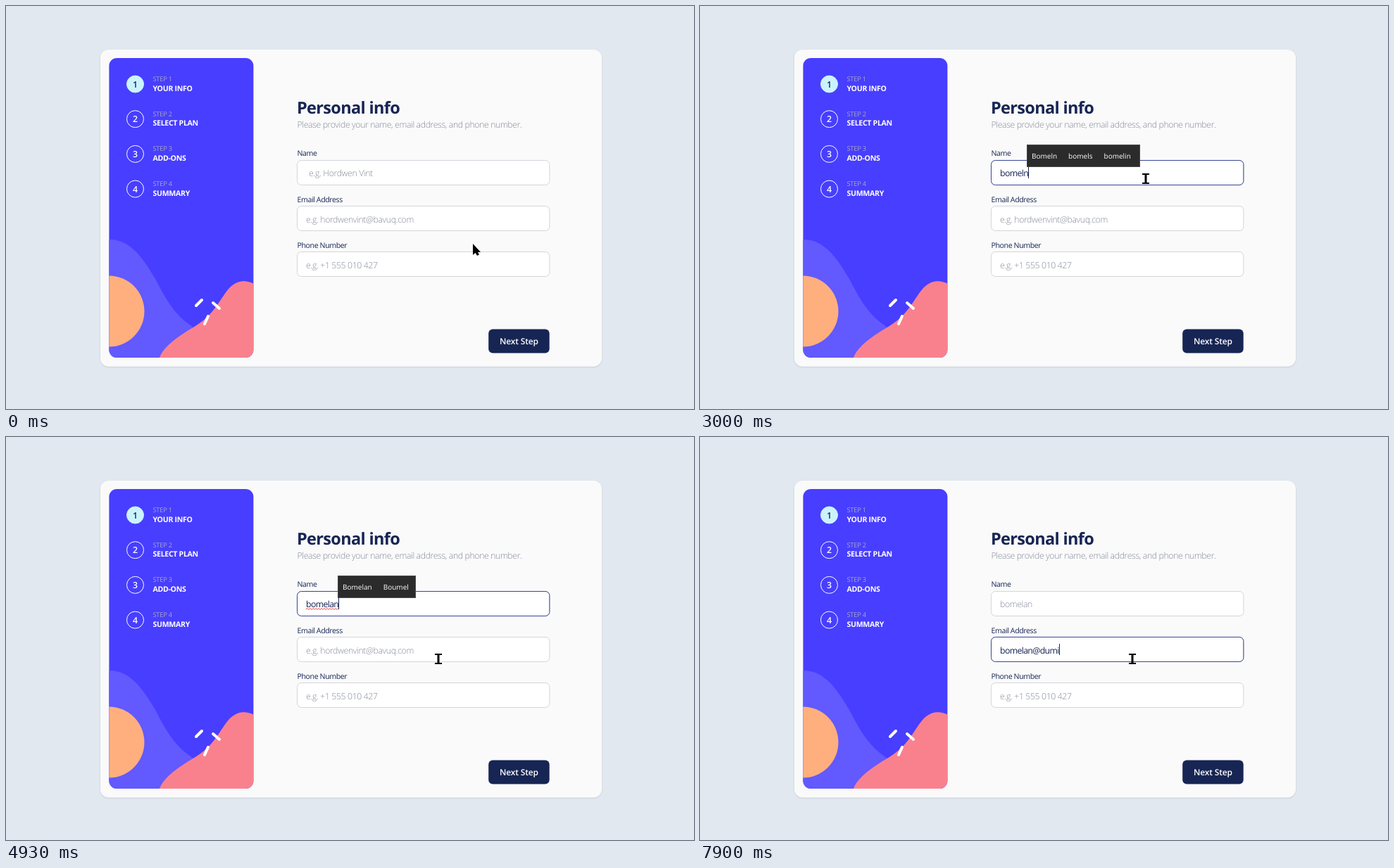
Write an HTML page that moves like this. It is 977x573 px and loops after 8 s.

```html
<!DOCTYPE html>
<html lang="en">
<head>
<meta charset="utf-8">
<title>Personal info form</title>
<style>
  html, body { margin: 0; width: 100%; height: 100%; overflow: hidden; background: #e2e8f0; }
  svg { display: block; width: 977px; height: 573px; }
  text { font-family: "Open Sans", "Noto Sans", sans-serif; text-rendering: geometricPrecision; fill: #172554; }
  .title { font-size: 23.5px; font-weight: 700; letter-spacing: -.67px; }
  .body { font-size: 12.3px; font-weight: 300; letter-spacing: -.39px; }
  .grey { fill: #838997; }
  .typed { font-size: 12.3px; letter-spacing: -.65px; }
  .label { font-size: 10.6px; letter-spacing: -.4px; }
  .step { font-size: 9.3px; letter-spacing: -.25px; fill: #a5a6c4; }
  .name { font-size: 10.6px; font-weight: 700; letter-spacing: -.32px; fill: #fff; }
  .num { font-size: 12.4px; font-weight: 600; text-anchor: middle; fill: #fff; }
  .button { font-size: 12px; font-weight: 600; letter-spacing: -.15px; text-anchor: middle; fill: #fff; }
  .word { font-size: 10px; font-weight: 500; fill: #fff; }
</style>
</head>
<body>
<svg id="stage" viewBox="0 0 977 573">
  <defs>
    <clipPath id="panel"><rect x="146.4" y="74" width="205" height="426" rx="11"/></clipPath>
    <filter id="soft" x="-5%" y="-5%" width="110%" height="110%">
      <feDropShadow dx="0" dy="1" stdDeviation="1" flood-color="#000" flood-opacity=".13"/>
    </filter>
  </defs>
  <rect x="134" y="62" width="712" height="450.5" rx="12" fill="#fafafa" filter="url(#soft)"/>
  <g clip-path="url(#panel)">
    <rect x="146" y="74" width="206" height="426" fill="#483eff"/>
    <path fill="#6259ff" d="M146 332C175 331 194 357 212 388C228 419 240 440 266 457L230 500H146Z"/>
    <path fill="#f9818e" d="M218 500C222 487 240 472 265 457.5C292 442 300 424 313 406C323 392.5 336 387 352 395V500Z"/>
    <circle cx="146" cy="434" r="50.5" fill="#ffaf7e"/>
    <path stroke="#fff" stroke-width="4" stroke-linecap="round" d="M270 426L278 418M294 422L303 430M282 452L287 441"/>
  </g>
  <g id="steps"></g>
  <text class="title" x="413" y="152.5">Personal info</text>
  <text class="body grey" x="413.5" y="172.5">Please provide your name, email address, and phone number.</text>
  <g id="fields"></g>
  <rect x="685.2" y="459.5" width="86.5" height="34" rx="6" fill="#172554"/>
  <text class="button" x="728.5" y="481.3">Next Step</text>
  <path id="squiggle" fill="none" stroke="#e5383b"/>
  <rect id="caret" width="1" height="16" fill="#172554"/>
  <g id="popup">
    <rect x=".5" y=".5" height="31" fill="#2b2b2b" stroke="#484848"/>
    <text class="word" x="7" y="20.3"></text>
  </g>
  <path id="arrow" d="M0 0V16L3.6 13L6 17L9 15.5L7 12H11Z"/>
  <path id="beam" d="M-5 -7H5V-5H1.5V6H5V8H-5V6H-1.5V-5H-5Z"/>
</svg>
<script>
const LOOP = 8000, TEXT_X = 426;
const $ = id => document.getElementById(id);

function add(parent, tag, attrs, text = "") {
  const el = document.createElementNS("http://www.w3.org/2000/svg", tag);
  for (const key in attrs) el.setAttribute(key, attrs[key]);
  el.textContent = text;
  return parent.appendChild(el);
}

["YOUR INFO", "SELECT PLAN", "ADD-ONS", "SUMMARY"].forEach((name, i) => {
  const y = 111 + i * 49.7, active = i === 0, g = $("steps");
  add(g, "circle", { cx: 183.5, cy: y, r: 12, fill: active ? "#cbf3fe" : "none", stroke: active ? "#cbf3fe" : "#fff" });
  add(g, "text", { class: "num", x: 183.5, y: y + 4.6, style: active ? "fill:#172554" : "" }, i + 1);
  add(g, "text", { class: "step", x: 208.5, y: y - 4 }, "STEP " + (i + 1));
  add(g, "text", { class: "name", x: 208.5, y: y + 9.6 }, name);
});

const fields = [
  ["Name", "e.g. Hordwen Vint", 430],
  ["Email Address", "e.g. hordwenvint@bavuq.com", TEXT_X],
  ["Phone Number", "e.g. +1 555 010 427", TEXT_X]
].map(([label, hint, hintX], i) => {
  const top = 219.5 + i * 65.4, g = $("fields");
  const box = { x: 413.5, y: Math.round(top) - .5, width: 358.4, height: 35, rx: 6 };
  add(g, "text", { class: "label", x: 413.5, y: top - 6.3 }, label);
  add(g, "rect", { ...box, fill: "#fff", stroke: "#d3d5dc" });
  const ring = add(g, "rect", { ...box, fill: "none", stroke: "#3a4695" });
  return { top, hint, hintX, ring, text: add(g, "text", { y: top + 22.8 }) };
});

// time, field, text typed so far
const keys = [
  [1560, 0, "b"], [1610, 0, "bo"], [1840, 0, "bom"], [1950, 0, "bomel"], [2060, 0, "bomela"],
  [2580, 0, "bomel"], [2720, 0, "bomeln"], [3220, 0, "bomel"], [3480, 0, "bomela"], [3550, 0, "bomelan"],
  [5720, 1, "b"], [5790, 1, "bo"], [6000, 1, "bom"], [6100, 1, "bome"], [6200, 1, "bomel"],
  [6300, 1, "bomela"], [6400, 1, "bomelan"], [7000, 1, "bomelan@"],
  [7470, 1, "bomelan@d"], [7610, 1, "bomelan@du"], [7760, 1, "bomelan@dum"], [7900, 1, "bomelan@dumi"]
];

// field, focus start, focus end, caret blink origin
const focuses = [[0, 610, 4950, 110], [1, 4950, LOOP, 5070]];

// from, to, left, top, width, suggestions
const popups = [
  [2340, 2580, 466, 197, 142, ["Bomelan", "bene", "benei"]],
  [3000, 3220, 464, 197, 161, ["Bomeln", "bomels", "bomelin"]],
  [3980, 4950, 471, 197, 111, ["Bomelan", "Boumel"]],
  [6650, 6930, 471, 263, 111, ["Bomelan", "Boumel"]]
];

// from, to, start point, end point
const moves = [[0, 640, 663, 338, 633, 245], [4400, 4900, 633, 245, 614, 315]];

let wave = "M426 245";
for (let x = 428, up = true; x <= 472; x += 2, up = !up) wave += `L${x} ${up ? 243.5 : 245.5}`;
$("squiggle").setAttribute("d", wave);

const clamp = v => Math.max(0, Math.min(1, v));
const ease = p => p * p * (3 - 2 * p);
const show = (el, on) => el.setAttribute("visibility", on ? "visible" : "hidden");
const place = (el, x, y) => el.setAttribute("transform", `translate(${x} ${y})`);

function drawFields(t) {
  const focus = focuses.find(f => t >= f[1] && t < f[2]);
  fields.forEach((field, i) => {
    const last = keys.filter(k => k[1] === i && k[0] <= t).pop();
    const focused = !!focus && focus[0] === i;
    const { text, top } = field;
    text.textContent = last ? last[2] : field.hint;
    text.setAttribute("x", last ? TEXT_X : field.hintX);
    text.setAttribute("class", last && focused ? "typed" : "body grey");
    field.ring.setAttribute("opacity", focused ? clamp((t - focus[1]) / 120) : 0);
    if (!focused) return;
    const origin = last ? last[0] : focus[3];
    const x = TEXT_X + (last ? text.getComputedTextLength() : 0);
    $("caret").setAttribute("x", Math.round(x));
    $("caret").setAttribute("y", Math.round(top + 9));
    show($("caret"), (t - origin) % 1000 < 500);
  });
  if (!focus) show($("caret"), false);
  show($("squiggle"), t >= 4440 && t < 4950);
}

function drawPopup(t) {
  const item = popups.find(p => t >= p[0] && t < p[1]);
  show($("popup"), item);
  if (!item) return;
  const [, , left, top, width, words] = item;
  const [box, line] = $("popup").children;
  place($("popup"), left, top);
  box.setAttribute("width", width - 1);
  line.textContent = "";
  words.forEach((word, i) => add(line, "tspan", { dx: i ? 16 : 0 }, word));
}

function drawPointer(t) {
  const [from, to, x0, y0, x1, y1] = moves[t < moves[1][0] ? 0 : 1];
  const p = ease(clamp((t - from) / (to - from)));
  const x = x0 + (x1 - x0) * p, y = y0 + (y1 - y0) * p;
  const typing = fields.some(f => y >= f.top && y <= f.top + 35);
  show($("beam"), typing);
  show($("arrow"), !typing);
  place($("beam"), x, y);
  place($("arrow"), x, y);
}

function draw() {
  const t = performance.now() % LOOP;
  drawFields(t);
  drawPopup(t);
  drawPointer(t);
  requestAnimationFrame(draw);
}
draw();
</script>
</body>
</html>
```
